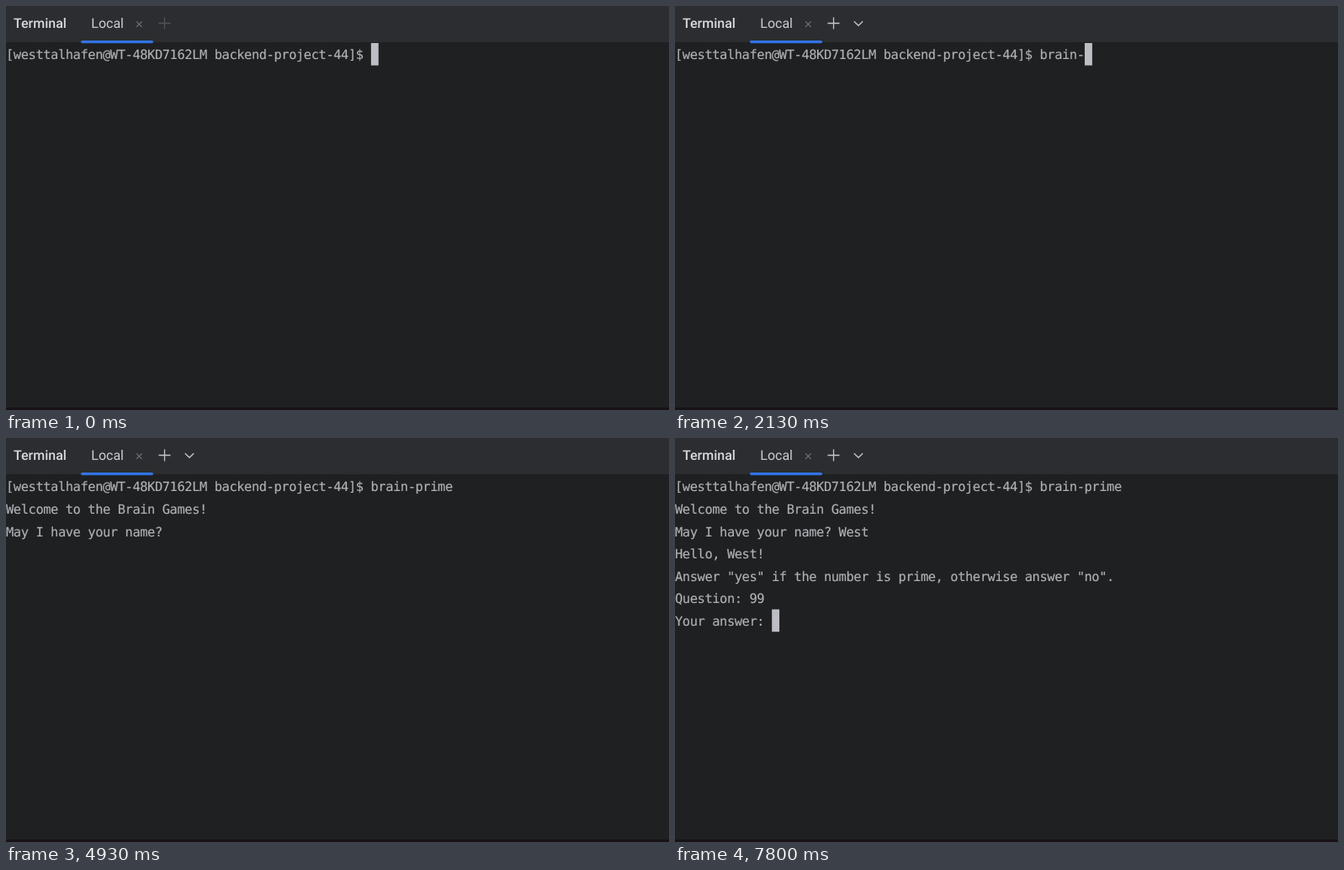
Animation of 788x480 px, one loop 8000 ms. Source, as an HTML page:

```html
<!DOCTYPE html>
<html lang="en">
<head>
<meta charset="utf-8">
<title>Terminal</title>
<style>
  html, body { margin: 0; height: 100%; overflow: hidden; background: #1f2022; }
  svg { display: block; width: 788px; height: 480px; }
  text { text-rendering: geometricPrecision; white-space: pre; }
  .tab { font: 400 16px Roboto, sans-serif; fill: #cdced3; }
  .tab.title { font-weight: 500; fill: #d8d9dd; }
  #rows {
    font: 15.4px "DejaVu Sans Mono", monospace; letter-spacing: -0.42px;
    fill: #b0b2b6; stroke: #b0b2b6; stroke-width: 0.15;
  }
  .icon { fill: none; stroke: #c4c6cb; stroke-width: 1.3; }
</style>
</head>
<body>
<svg viewBox="0 0 788 480">
  <rect width="788" height="480" fill="#1f2022"/>
  <rect width="788" height="43" fill="#2b2d30"/>
  <rect y="477" width="788" height="3" fill="#181216"/>
  <text class="tab title" x="9" y="26.4">Terminal</text>
  <text class="tab" x="101.3" y="26.4">Local</text>
  <rect x="89" y="41" width="86" height="3.2" rx="1.6" fill="#3273e3"/>
  <path class="icon" d="M155 18.3l6.6 6.6m0-6.6l-6.6 6.6" style="stroke:#73767b;stroke-width:1.1"/>
  <path class="icon" id="plus" d="M181.5 20.5h14m-7-7v14"/>
  <path class="icon" id="chevron" d="M212.8 18.3l5.2 5 5.2-5"/>
  <g id="rows"></g>
  <rect id="cursor" width="8.9" height="26.6" fill="#bdbdc3"/>
</svg>
<script>
const LOOP = 8000, CELL = 8.852, PITCH = 26.6, TOP = 44;
const $ = id => document.getElementById(id);

const PROMPT = "[westtalhafen@WT-48KD7162LM backend-project-44]$ ";
const COMMAND = "brain-prime", NAME = "West";
const commandKeys = [730, 1070, 1200, 1400, 1530, 2070, 2330, 2730, 3130, 3530, 3600];
const nameKeys = [5070, 5200, 5400, 5600];
const STARTED = 3930, ASKED = 5930;
const hidden = [[4930, 5070], [7000, 7730]];

const rows = Array.from({ length: 7 }, (_, i) => {
  const row = document.createElementNS("http://www.w3.org/2000/svg", "text");
  row.setAttribute("x", 0);
  row.setAttribute("y", TOP + 19.4 + i * PITCH);
  return $("rows").appendChild(row);
});

const typed = (text, keys, t) => text.slice(0, keys.filter(k => k <= t).length);

function screen(t) {
  const lines = [PROMPT + typed(COMMAND, commandKeys, t)];
  if (t >= STARTED)
    lines.push("Welcome to the Brain Games!",
      "May I have your name? " + typed(NAME, nameKeys, t));
  if (t >= ASKED)
    lines.push(`Hello, ${NAME}!`,
      'Answer "yes" if the number is prime, otherwise answer "no".',
      "Question: 99", "Your answer: ");
  return lines;
}

function draw(t) {
  const lines = screen(t), last = lines.length - 1;
  rows.forEach((row, i) => {
    const text = lines[i] || "";
    if (row.textContent !== text) row.textContent = text;
  });

  const cursor = $("cursor");
  cursor.setAttribute("x", 0.1 + lines[last].length * CELL);
  cursor.setAttribute("y", TOP + last * PITCH);
  cursor.style.opacity = hidden.some(([a, b]) => t >= a && t < b) ? 0 : 1;

  // The toolbar icons fade in over seven steps
  const fade = t < 130 ? 0 : Math.min(1, (Math.floor((t - 130) / 66.6) + 1) / 7);
  $("plus").style.opacity = 0.25 + 0.75 * fade;
  $("chevron").style.opacity = fade;
}

const start = performance.now();
function tick() {
  draw((performance.now() - start) % LOOP);
  requestAnimationFrame(tick);
}
tick();
</script>
</body>
</html>
```
